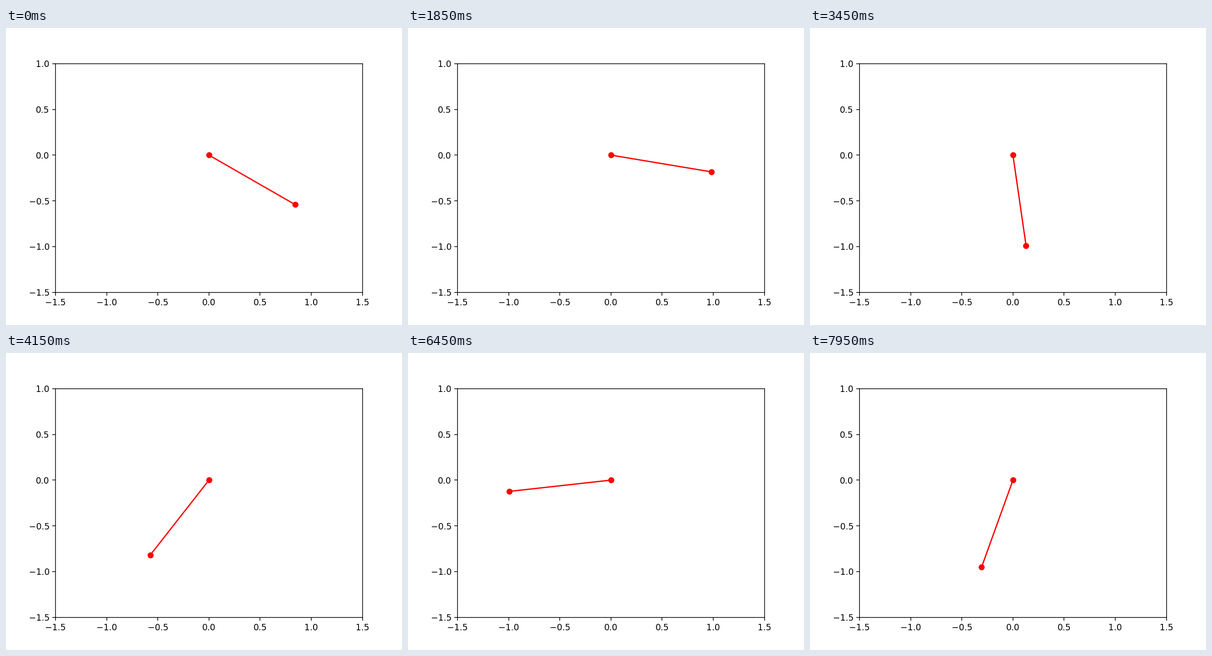
Write a matplotlib script that moves like this. It is 864 px wide and 648 px high and loops after 8 s.

```python
import numpy as np
import matplotlib.pyplot as plt
from matplotlib.animation import FuncAnimation

FRAMES, INTERVAL = 160, 50
G, LENGTH, DT = 9.81, 1.0, 0.0126


def swing(angle, speed, n):
    """Angles of a free pendulum, advanced with constant acceleration per step."""
    angles = np.empty(n)
    for i in range(n):
        angles[i] = angle
        accel = -G / LENGTH * np.sin(angle)
        angle += speed * DT + 0.5 * accel * DT**2
        speed += accel * DT
    return angles


angles = swing(1.0, 3.0, FRAMES)

fig, ax = plt.subplots(figsize=(6.4, 4.8), dpi=135)
ax.set_xlim(-1.5, 1.5)
ax.set_ylim(-1.5, 1.0)
ax.set_yticks(np.arange(-1.5, 1.01, 0.5))
rod, = ax.plot([], [], "ro-")


def update(i):
    a = angles[i]
    rod.set_data([0, LENGTH * np.sin(a)], [0, -LENGTH * np.cos(a)])
    return rod,


anim = FuncAnimation(fig, update, frames=FRAMES, interval=INTERVAL,
                     repeat=True, repeat_delay=0)
plt.show()
```
